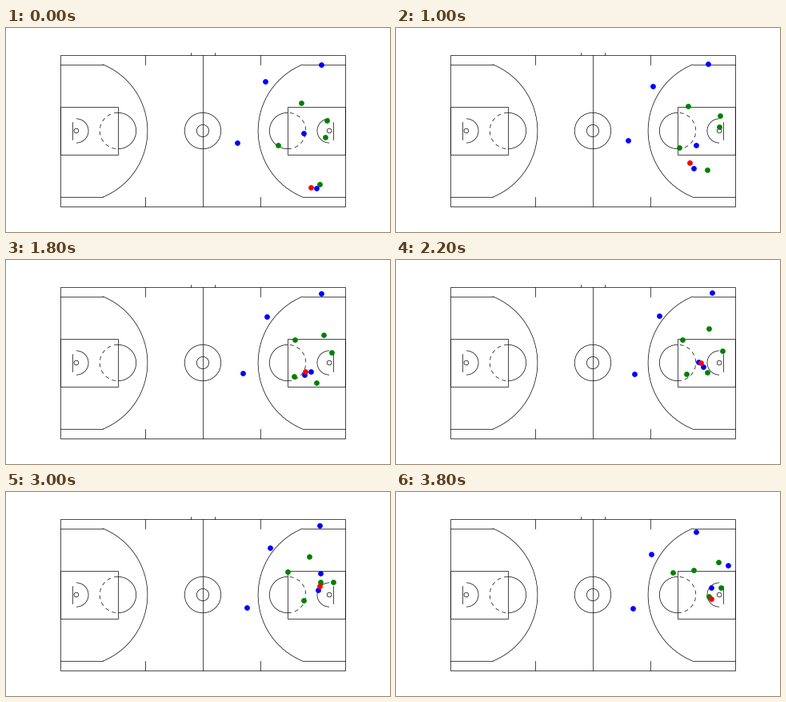
Recreate the animation shown at these times as a matplotlib script. Size 480x256 px, loop 4000 ms.

```python
import numpy as np
import matplotlib.pyplot as plt
from matplotlib.animation import FuncAnimation
from matplotlib.patches import Arc, Circle, Rectangle

W, H, DPI = 480, 256, 100
FRAMES, STEP = 20, 200
FT = 356 / 94               # pixels per foot
CX, CY = 246, H - 129       # centre of the court
LW = 0.7 * 72 / DPI         # 0.7 pixel

fig = plt.figure(figsize=(W / DPI, H / DPI), dpi=DPI, facecolor="white")
ax = fig.add_axes([0, 0, 1, 1])
ax.set(xlim=(0, W), ylim=(0, H))
ax.axis("off")


# Court coordinates are feet from the centre spot
def line(x0, y0, x1, y1):
    ax.plot([CX + x0 * FT, CX + x1 * FT], [CY + y0 * FT, CY + y1 * FT],
            color="black", lw=LW, solid_capstyle="projecting")


def arc(x, r, start=0, end=360, style="-"):
    ax.add_patch(Arc((CX + x * FT, CY), 2 * r * FT, 2 * r * FT,
                     theta1=start, theta2=end, color="black", lw=LW, ls=style))


def box(x, y, w, h):
    ax.add_patch(Rectangle((CX + x * FT, CY + y * FT), w * FT, h * FT,
                           fill=False, ec="black", lw=LW))


def half(side):
    """One end of the court: -1 is left, 1 is right."""
    face = 0 if side < 0 else 180    # direction towards the centre
    hoop, foul = side * 41.75, side * 28
    box(-47 if side < 0 else 28, -8, 19, 16)
    arc(foul, 6, face - 90, face + 90)
    arc(foul, 6, face + 90, face + 270, (0, (7, 6)))
    arc(hoop, 0.75)
    arc(hoop, 4, face - 90, face + 90)
    line(side * 43, -3, side * 43, 3)
    reach = np.degrees(np.arcsin(22 / 23.75))
    arc(side * 42, 23.75, face - reach, face + reach)
    for y in (-1, 1):
        line(side * 47, y * 22, side * 33, y * 22)
        line(side * 19, y * 25, side * 19, y * 22)
    line(side * 4, 25, side * 4, 26)


class Dot:
    """A player or the ball on a cubic path through four evenly timed points."""

    def __init__(self, color, *points):
        self.path = np.polyfit(np.linspace(0, FRAMES - 1, 4), points, 3)
        self.mark = ax.add_patch(
            Circle((0, 0), 3.4, fc=color, ec="none", zorder=5))

    def move(self, i):
        x, y = np.round(i ** np.arange(3, -1, -1) @ self.path)
        self.mark.center = (x + 0.5, H - y - 0.5)


box(-47, -25, 94, 50)
line(0, -25, 0, 25)
arc(0, 6)
arc(0, 2)
half(-1)
half(1)

dots = [
    # defence
    Dot("green", (369, 94), (364, 99), (356, 100), (346, 101)),
    Dot("green", (401, 116), (403, 105), (386, 82), (372, 98)),
    Dot("green", (399, 137), (405, 121), (409, 113), (406, 120)),
    Dot("green", (340, 147), (356, 149), (366, 140), (391, 131)),
    Dot("green", (392, 196), (388, 171), (390, 129), (403, 88)),
    # offence
    Dot("blue", (394, 46), (391, 44), (395, 41), (375, 50)),
    Dot("blue", (324, 67), (322, 73), (330, 69), (319, 78)),
    Dot("blue", (289, 144), (292, 141), (300, 144), (296, 146)),
    Dot("blue", (372, 132), (377, 146), (387, 129), (394, 120)),
    Dot("blue", (388, 201), (371, 166), (383, 116), (415, 92)),
    # ball
    Dot("red", (381, 200), (368, 159), (386, 122), (394, 134)),
]


def update(i):
    for dot in dots:
        dot.move(i)
    return [dot.mark for dot in dots]


anim = FuncAnimation(fig, update, frames=FRAMES, interval=STEP,
                     repeat=True, repeat_delay=0)
plt.show()
```
